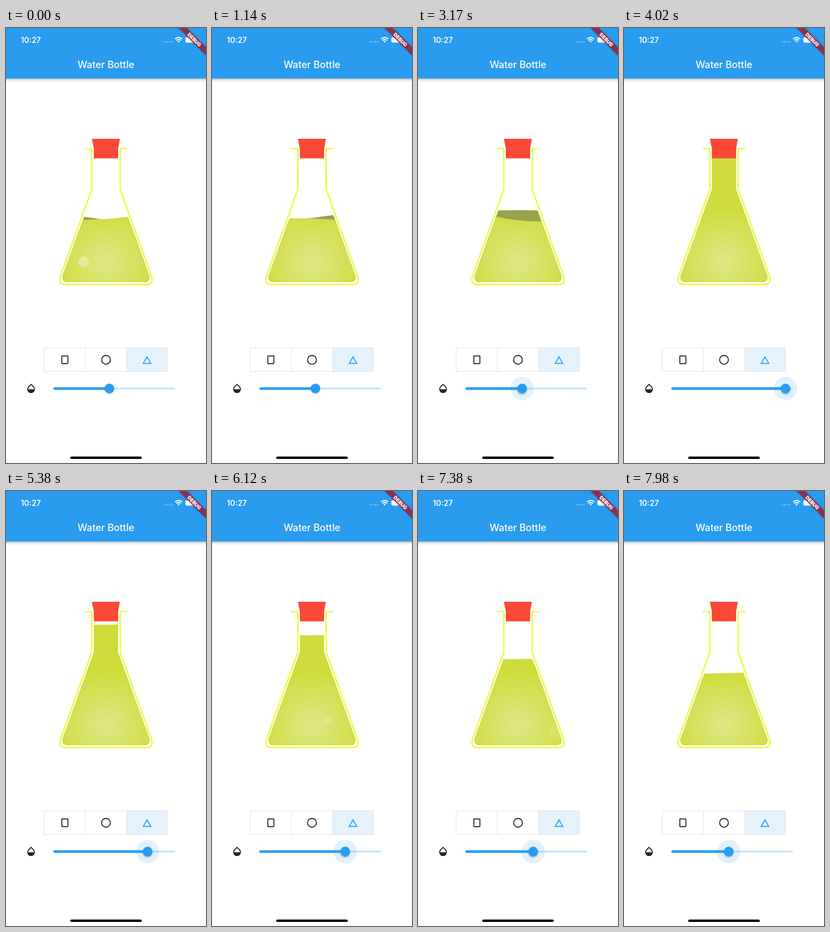
Animation, 296 px wide and 640 px high, one loop 8 s. Source, as an HTML page:

```html
<!DOCTYPE html>
<html lang="en">
<head>
<meta charset="utf-8">
<title>Water Bottle</title>
<style>
  html, body { margin: 0; width: 100%; height: 100%; overflow: hidden; background: #fff; }
  svg { display: block; width: 100vw; height: 100vh; }
  text { font-family: Inter, Roboto, sans-serif; fill: #fff; }
</style>
</head>
<body>
<svg viewBox="0 0 296 640">
  <defs>
    <radialGradient id="liquid" gradientUnits="userSpaceOnUse" cx="148" cy="344" r="80">
      <stop offset="0" stop-color="#dfe886"/>
      <stop offset="1" stop-color="#cedb3b"/>
    </radialGradient>
    <linearGradient id="barShadow" x2="0" y2="1">
      <stop offset="0" stop-color="#000" stop-opacity=".28"/>
      <stop offset=".4" stop-color="#000" stop-opacity=".1"/>
      <stop offset="1" stop-color="#000" stop-opacity="0"/>
    </linearGradient>
    <filter id="soft" x="-50%" y="-50%" width="200%" height="200%">
      <feGaussianBlur stdDeviation="1.3"/>
    </filter>
    <clipPath id="inside">
      <path d="M130 191V238L84.3 363Q81 374 92 374H204Q215 374 211.7 363L166 238V191Z"/>
    </clipPath>
    <clipPath id="wet"><path id="wetPath"/></clipPath>
  </defs>

  <!-- App bar and status bar -->
  <rect y="74" width="296" height="6" fill="url(#barShadow)"/>
  <rect width="296" height="74.3" fill="#2a9cf0"/>
  <text x="22" y="22" font-size="11.4" font-weight="600">10:27</text>
  <text x="148" y="59.3" font-size="14.3" font-weight="500" text-anchor="middle">Water Bottle</text>
  <g fill="#fff" fill-opacity=".45">
    <circle cx="234.6" cy="20.3" r="1.1"/><circle cx="238.2" cy="20.3" r="1.1"/>
    <circle cx="241.8" cy="20.3" r="1.1"/><circle cx="245.4" cy="20.3" r="1.1"/>
  </g>
  <g fill="none" stroke="#fff" stroke-width="1.7">
    <path d="M250.3 16.2Q255.5 11.6 260.7 16.2M252.2 18.3Q255.5 15.4 258.8 18.3"/>
    <path d="M253.7 19.6Q255.5 18.2 257.3 19.6L255.5 21.6Z" fill="#fff" stroke="none"/>
  </g>
  <rect x="265.5" y="13.6" width="15.5" height="7.8" rx="2" fill="#fff"/>
  <path d="M282 16v3q1.2-1.5 0-3" fill="#fff"/>
  <g transform="translate(296 0) rotate(45)">
    <rect x="-28.6" y="20" width="57.2" height="8.6" filter="url(#soft)" opacity=".35"/>
    <rect x="-28.6" y="20" width="57.2" height="8.6" fill="#a0263c" fill-opacity=".82"/>
    <text y="26.9" font-size="7.3" font-weight="900" text-anchor="middle">DEBUG</text>
  </g>

  <!-- Flask -->
  <g clip-path="url(#inside)">
    <path id="back" fill="#98a34c"/>
    <path id="front" fill="url(#liquid)"/>
    <g id="bubbles" clip-path="url(#wet)" fill="#f1f4cf"></g>
  </g>
  <path d="M127 163H168.6L166 177V191.7H130V177Z" fill="#fa4a37"/>
  <path d="M116.5 177.5H127V237.5L81 364Q76.500 377.300 88 377.300H208Q219.500 377.300 215 364L169 237.500V177.500H179.500"
        fill="none" stroke="#eefb3f" stroke-width="2.2"/>

  <!-- Shape selector -->
  <rect x="178.500" y="470.500" width="60.500" height="35" fill="#e5f2fd"/>
  <path d="M56.500 470.500H239V505.500H56.500ZM117.500 470.500v35M178.500 470.500v35"
        fill="none" stroke="#e0e2e4" stroke-width=".8"/>
  <g fill="none" stroke="#222" stroke-width="1.45">
    <rect x="82.600" y="482.400" width="9" height="11.400" rx=".7"/>
    <circle cx="148" cy="488.200" r="6.500"/>
    <path d="M208.700 483.800L214.300 493.400H203.100Z" stroke="#2a9cf0"/>
  </g>

  <!-- Level slider -->
  <path transform="translate(28.500 521.600) scale(.715)" fill="#222" d="M17.660 8L12 2.350 6.340 8C4.780 9.560 4 11.640 4 13.640s.78 4.110 2.340 5.670 3.610 2.350 5.660 2.350 4.100-.79 5.660-2.350S20 15.640 20 13.640 19.220 9.560 17.660 8zM6 14c.01-2 .62-3.270 1.760-4.400L12 5.270l4.240 4.380C17.380 10.770 17.990 12 18 14H6z"/>
  <rect x="70" y="529.100" width="180" height="2.800" rx="1.400" fill="#cce6fb"/>
  <rect id="active" x="70" y="528.400" height="4.200" rx="2.100" fill="#2a9cf0"/>
  <g id="thumb">
    <circle id="halo" fill="#2a9cf0" fill-opacity=".14"/>
    <circle id="thumbShadow" cy="1.500" r="7" filter="url(#soft)"/>
    <circle r="7.200" fill="#2a9cf0"/>
  </g>

  <rect x="95" y="630.500" width="106" height="3.600" rx="1.800" fill="#000"/>
</svg>
<script>
const LOOP = 8000;
const el = id => document.getElementById(id);
const clamp = v => Math.max(0, Math.min(1, v));
const ease = v => v * v * (3 - 2 * v);

// Each row: time in ms, then the values reached at that time.
const thumbKeys = [[0, 153], [2850, 153], [3170, 154], [3350, 158], [3900, 236],
  [4020, 239], [4500, 239], [5380, 209.5], [6760, 186.5], [8000, 154.5]];

// Surface height below the nominal level at the left, middle and right.
const frontKeys = [[0, 14, 12.5, 8.5], [1140, 11, 12, 13.5], [3170, 8.5, 16, 17.5],
  [4020, 6, 8, 6], [5380, .5, 0, -.7], [6760, 0, 0, 0], [8000, 3.2, 2.3, 1.2]];
const backKeys = [[0, 8, 14, 19], [1140, 16, 11, 5.5], [3170, 1.5, .8, 1.5],
  [4020, 9, 10, 9], [8000, 9, 10, 9]];

// Start, duration, x, start y, rise and final radius.
const bubbles = [[-900, 1700, 115, 354, 19, 12], [5750, 1650, 170, 346, 33, 14],
  [6150, 1500, 207, 369, 20, 15]];
const bubbleNodes = bubbles.map(() => el('bubbles').appendChild(
  document.createElementNS('http://www.w3.org/2000/svg', 'circle')));

function sample(keys, t) {
  let i = 0;
  while (i < keys.length - 2 && t >= keys[i + 1][0]) i++;
  const [a, b] = [keys[i], keys[i + 1]];
  const k = clamp((t - a[0]) / (b[0] - a[0]));
  return a.slice(1).map((v, j) => v + (b[j + 1] - v) * k);
}

function waterPath(level, offsets) {
  const [left, middle, right] = offsets.map(v => level + v);
  const bend = 2 * middle - (left + right) / 2;
  return `M60 400V${left}H108Q148 ${bend} 188 ${right}H236V400Z`;
}

function draw(t) {
  const [x] = sample(thumbKeys, t);
  const level = 374 - (x - 70) / 180 * 229;
  const surface = waterPath(level, sample(frontKeys, t));
  el('back').setAttribute('d', waterPath(level, sample(backKeys, t)));
  el('front').setAttribute('d', surface);
  el('wetPath').setAttribute('d', surface);

  bubbles.forEach(([start, life, cx, y, rise, radius], i) => {
    const k = clamp((t - start) / life);
    const node = bubbleNodes[i];
    node.setAttribute('cx', cx);
    node.setAttribute('cy', y - rise * k);
    node.setAttribute('r', radius * (.3 + .7 * k));
    node.setAttribute('opacity', .55 * Math.sin(Math.PI * k) ** 2 * (1 - k * .2));
  });

  const press = ease(clamp((t - 2850) / 200));
  el('thumb').setAttribute('transform', `translate(${x} 530.5)`);
  el('active').setAttribute('width', x - 70);
  el('halo').setAttribute('r', 17.2 * press);
  el('thumbShadow').setAttribute('opacity', .12 + .2 * press);
}

function frame() {
  draw(performance.now() % LOOP);
  requestAnimationFrame(frame);
}
frame();
</script>
</body>
</html>
```
